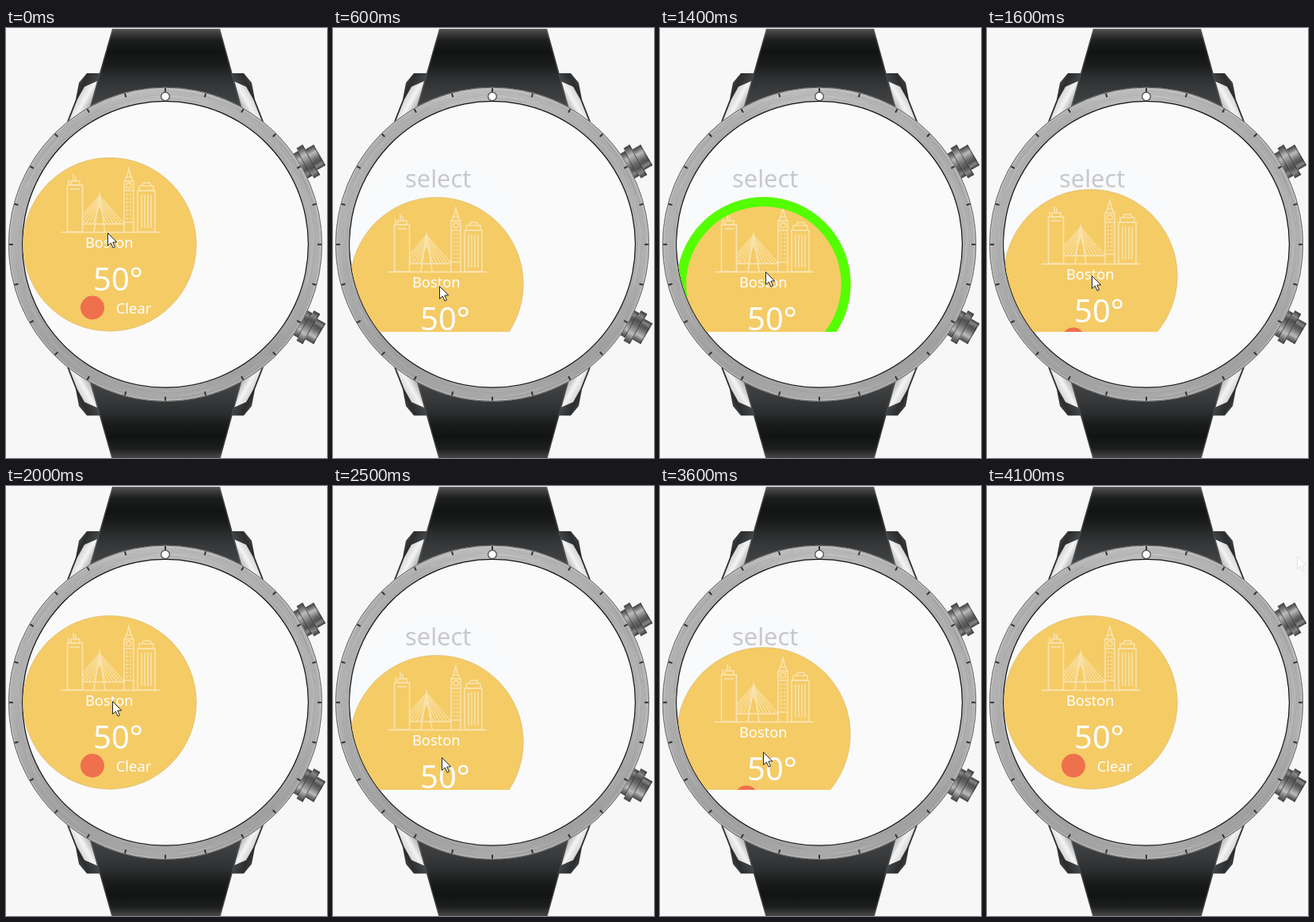
Recreate the animation shown at these times as an HTML page with a canvas. Size 405 px wide and 542 px high, loop 4.6 s.

```html
<!DOCTYPE html>
<html lang="en">
<head>
<meta charset="utf-8">
<title>Watch select</title>
<style>
  html, body { margin: 0; width: 100%; height: 100%; overflow: hidden; background: #f7f7f7; }
  canvas { display: block; }
</style>
</head>
<body>
<canvas id="stage" width="405" height="542"></canvas>
<script>
const W = 405, H = 542, LOOP = 4600, STEP = 100;
const CX = 201, CY = 272.8, TAU = Math.PI * 2;
const CARD = { x: 130.8, y: 272.8, r: 109.6 };
const PULL = 50, DRAG_TIME = 400, RETURN_TIME = 300;
const EXIT = { start: 3800, time: 300, to: [391, 88] };
const DRAGS = [
  { start: 200, from: [128, 258], to: [134, 325] },
  { start: 1100, from: [139, 262], to: [132, 315] },
  { start: 2100, from: [134, 268], to: [137, 342] },
  { start: 3100, from: [143, 259], to: [130, 335] }
];
const stage = document.getElementById('stage').getContext('2d');

const clamp = p => Math.max(0, Math.min(1, p));
const smooth = p => p * p * (3 - 2 * p);
const mix = (a, b, p) => a.map((v, i) => v + (b[i] - v) * p);

// Pull with the finger, then fall back with growing speed.
function scrollAt(age) {
  const pulled = clamp(age / 300);
  const returned = clamp((age - DRAG_TIME) / RETURN_TIME) ** 1.5;
  return PULL * (pulled - returned);
}

function pointerAt(t, drag, next) {
  const age = t - drag.start;
  if (age <= DRAG_TIME) return mix(drag.from, drag.to, smooth(clamp(age / DRAG_TIME)));
  if (!next) return mix(drag.to, EXIT.to, clamp((t - EXIT.start) / EXIT.time));
  const wait = next.start - drag.start - DRAG_TIME;
  return mix(drag.to, next.from, smooth((age - DRAG_TIME) / wait));
}

function poly(c, points) {
  c.beginPath();
  points.forEach(p => c.lineTo(...p));
  c.closePath();
}

function disc(c, x, y, r, fill) {
  c.beginPath();
  c.arc(x, y, r, 0, TAU);
  c.fillStyle = fill;
  c.fill();
}

function ring(c, x, y, r, width, color) {
  c.beginPath();
  c.arc(x, y, r, 0, TAU);
  c.lineWidth = width;
  c.strokeStyle = color;
  c.stroke();
}

// Spread the colours evenly along a gradient.
function shade(gradient, ...colors) {
  colors.forEach((color, i) => gradient.addColorStop(i / (colors.length - 1), color));
  return gradient;
}

function text(c, value, x, y, size, color) {
  c.font = `${size}px "Noto Sans", "Open Sans", sans-serif`;
  c.textAlign = 'center';
  c.fillStyle = color;
  c.fillText(value, x, y);
}

function mirrored(c, sx, sy, paint) {
  c.save();
  c.translate(CX, CY);
  c.scale(sx, sy);
  c.translate(-CX, -CY);
  paint(c);
  c.restore();
}

function drawLug(c) {
  poly(c, [[102, 57], [120, 57], [112, 115], [77, 118], [88, 90], [92, 69]]);
  c.fillStyle = shade(c.createLinearGradient(88, 60, 112, 72), '#5c5e60', '#2b2d2f', '#434547');
  c.fill();
  poly(c, [[115, 67], [110, 112], [79, 118], [90, 90], [99, 74]]);
  c.fillStyle = shade(c.createLinearGradient(86, 82, 114, 98), '#777', '#d8d8d8', '#f4f4f4', '#bcbcbc', '#858585');
  c.fill();
}

function drawStrap(c) {
  poly(c, [[134, 1], [270, 1], [299, 106], [104, 106]]);
  c.fillStyle = shade(c.createLinearGradient(0, 0, 0, 106),
    '#555', '#1d1e1e', '#121313', '#1a1b1b', '#2b2d2e', '#36383a', '#3e4042', '#444648');
  c.fill();
  c.save();
  c.clip();
  c.strokeStyle = 'rgba(110,112,114,.4)';
  c.lineWidth = 3;
  c.stroke();
  c.restore();
}

function drawButton(c) {
  c.translate(CX, CY);
  c.rotate(-.525);
  const segment = (from, to, half) => {
    c.fillStyle = shade(c.createLinearGradient(0, -half, 0, half),
      '#444', '#777', '#bbb', '#929292', '#666', '#505050', '#868686', '#3c3c3c');
    c.fillRect(from, -half, to - from, half * 2);
    c.fillStyle = 'rgba(40,40,40,.5)';
    c.fillRect(to - 1.5, -half, 1.5, half * 2);
  };
  segment(192, 204, 18);
  segment(204, 213, 22);
  segment(213, 225, 15);
}

function drawBezel(c) {
  const grays = Array.from({ length: 25 }, (_, i) => {
    const a = i * TAU / 24;
    const v = Math.round(172 + 9 * Math.cos(a) + 6 * Math.cos(4 * a));
    return `rgb(${v},${v},${v})`;
  });
  disc(c, CX, CY, 198, shade(c.createConicGradient(-TAU / 4, CX, CY), ...grays));
  let seed = 7;
  const random = () => (seed = seed * 16807 % 2147483647) / 2147483647;
  for (let i = 0; i < 90; i++) {
    const start = random() * TAU;
    c.beginPath();
    c.arc(CX, CY, 183 + random() * 12, start, start + .1 + random() * .4);
    c.strokeStyle = random() < .5 ? 'rgba(255,255,255,.10)' : 'rgba(70,70,70,.07)';
    c.lineWidth = 1;
    c.stroke();
  }
  ring(c, CX, CY, 196.5, 1, 'rgba(230,230,230,.5)');
  ring(c, CX, CY, 197.6, 1, '#6c6c6c');
  for (let i = 0; i < 24; i++) {
    c.save();
    c.translate(CX, CY);
    c.rotate(i * TAU / 24);
    c.fillStyle = '#333';
    c.fillRect(-1, -197, 2, 5);
    c.restore();
  }
  disc(c, CX, CY, 181, '#111');
  disc(c, CX, CY, 179.8, '#fafafa');
  disc(c, CX, 86.3, 6, '#555');
  disc(c, CX, 86.3, 4.6, '#fff');
}

function drawWatch(c) {
  c.fillStyle = '#f7f7f7';
  c.fillRect(0, 0, W, H);
  for (const sy of [1, -1]) {
    for (const sx of [1, -1]) mirrored(c, sx, sy, drawLug);
    mirrored(c, 1, sy, drawStrap);
    mirrored(c, 1, sy, drawButton);
  }
  drawBezel(c);
}

function drawSkyline(c) {
  const line = (...p) => {
    c.beginPath();
    for (let i = 0; i < p.length; i += 2) c.lineTo(p[i], p[i + 1]);
    c.stroke();
  };
  c.strokeStyle = '#fae5b3';
  c.lineWidth = 1.5;
  line(69, 257.5, 194, 257.5);
  // Left tower
  c.strokeRect(77.5, 198, 19, 59);
  c.strokeRect(82, 193, 11, 5);
  line(79, 198, 79, 191);
  line(85, 193, 85, 185);
  line(88, 193, 88, 187);
  line(81, 203, 93, 203);
  // Cable bridge
  c.save();
  c.beginPath();
  c.rect(97, 205, 52, 53);
  c.clip();
  line(97, 247, 149, 247);
  line(111, 257, 118, 210, 125, 257);
  c.lineWidth = 1.1;
  for (let i = 0; i < 6; i++) {
    const reach = 31 - i * 4.5;
    line(118 - reach, 247, 118, 211 + i * 2.5, 118 + reach, 247);
  }
  c.restore();
  // Clock tower
  line(149, 257, 149, 193, 161, 193, 161, 257);
  line(150, 193, 153, 185, 155, 177, 157, 185, 160, 193);
  line(151, 188, 159, 188);
  ring(c, 155, 198.5, 3.3, 1.4, '#fae5b3');
  line(149, 205, 161, 205);
  for (let y = 210; y < 244; y += 5) {
    line(151.5, y, 154, y);
    line(156, y, 158.5, y);
  }
  line(149, 245, 161, 245);
  // Right tower
  c.strokeRect(166, 205, 22, 52);
  c.strokeRect(168, 199, 18, 6);
  line(171, 199, 174, 195, 181, 195, 184, 199);
  for (let x = 171; x < 185; x += 4) line(x, 210, x, 252);
}

function drawCard(c, selected) {
  disc(c, CARD.x, CARD.y, CARD.r, '#f5cb66');
  ring(c, CARD.x, CARD.y, CARD.r - .3, .6, '#d9bd7c');
  drawSkyline(c);
  text(c, 'Boston', 130.3, 276.7, 18.3, '#fff');
  text(c, '50°', 141.5, 330.5, 40, '#fff');
  disc(c, 109, 352.5, 15, '#ef704c');
  text(c, 'Clear', 161, 360, 18.3, '#fff');
  if (selected) ring(c, CARD.x, CARD.y, CARD.r - 5.8, 12, '#54ff00');
}

function drawPointer(c, x, y) {
  c.save();
  c.translate(x + .5, y + .5);
  poly(c, [[0, 0], [0, 16], [3.8, 12.6], [6.6, 18.6], [9, 17.5], [6.3, 11.6], [11.2, 11.4]]);
  c.fillStyle = '#fff';
  c.fill();
  c.lineWidth = 1;
  c.strokeStyle = x > 385 ? '#e2e2e2' : '#222';
  c.stroke();
  c.restore();
}

const watch = document.createElement('canvas');
watch.width = W;
watch.height = H;
drawWatch(watch.getContext('2d'));

function draw(time) {
  const t = Math.floor(time % LOOP / STEP) * STEP;
  const index = Math.max(0, DRAGS.findLastIndex(d => t >= d.start));
  const drag = DRAGS[index];
  const offset = scrollAt(t - drag.start);
  const [x, y] = pointerAt(t, drag, DRAGS[index + 1]);
  // Each release flips the selection.
  const selected = DRAGS.filter(d => t > d.start + DRAG_TIME).length % 2 === 1;
  const c = stage;
  c.drawImage(watch, 0, 0);
  c.save();
  c.beginPath();
  c.arc(CX, CY, 180, 0, TAU);
  c.clip();
  c.beginPath();
  c.rect(21, 163, 220, 220);
  c.clip();
  if (offset) {
    disc(c, CARD.x, CARD.y, CARD.r, '#f8fafc');
    text(c, 'select', 132.7, 201, 30.8, '#c9c9cc');
  }
  c.translate(0, Math.round(offset));
  drawCard(c, selected);
  c.restore();
  drawPointer(c, Math.round(x), Math.round(y));
}

const start = performance.now();
function tick() {
  draw(performance.now() - start);
  requestAnimationFrame(tick);
}
tick();
</script>
</body>
</html>
```
